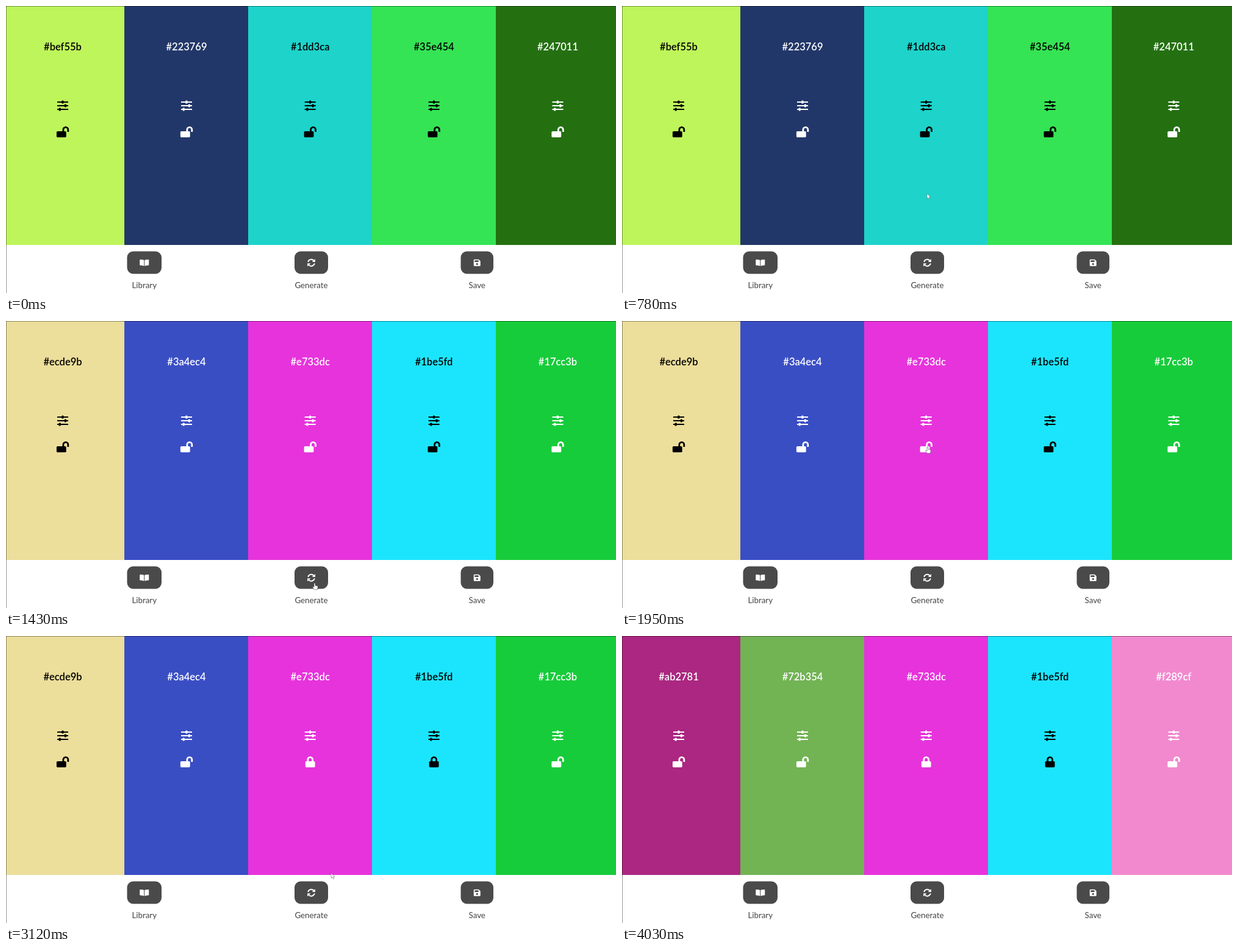
Write an HTML page that moves like this. It is 1000 by 472 pixels and loops after 5.07 s.

```html
<!DOCTYPE html>
<html lang="en">
<head>
<meta charset="utf-8">
<title>Palette generator</title>
<style>
  html, body { margin: 0; width: 100%; height: 100%; overflow: hidden; background: #fff; }
  svg { display: block; width: 100%; height: 100%; }
  text { font-family: Lato, "Open Sans", sans-serif; text-anchor: middle; }
  .hex { font-size: 16.5px; font-weight: 600; }
  .label { font-size: 13.3px; fill: #444; }
  .line { fill: none; stroke: currentColor; }
</style>
</head>
<body>
<svg id="stage" viewBox="0 0 1000 472">
  <defs>
    <g id="sliders" fill="currentColor">
      <path class="line" stroke-width="2" d="M-9 -6H9M-9 0H9M-9 6H9"/>
      <rect x="-1.7" y="-8.6" width="3.2" height="5.2" rx="1"/>
      <rect x="2.8" y="-2.6" width="3.2" height="5.2" rx="1"/>
      <rect x="-6.4" y="3.4" width="3.2" height="5.2" rx="1"/>
    </g>
    <g id="open" fill="currentColor">
      <rect x="-10.1" y="-1.1" width="15.8" height="10.1" rx="1.7"/>
      <path class="line" stroke-width="2.8" d="M.9 0V-3.7a3.94 3.94 0 0 1 7.9 0V0"/>
    </g>
    <g id="closed" fill="currentColor">
      <rect x="-7.9" y="-1.1" width="15.8" height="10.1" rx="1.7"/>
      <path class="line" stroke-width="2.8" d="M-3.94 0V-3.7a3.94 3.94 0 0 1 7.88 0V0"/>
    </g>
    <path id="page" d="M-.5 5.4V-4.1C-2.5 -5.3 -5 -5.4 -7 -5.2Q-7.5 -5.1 -7.5 -4.5V3.6Q-7.5 4.2 -7 4.2C-5 4.3 -2.5 4.5 -.5 5.4Z"/>
    <g id="book" fill="currentColor">
      <use href="#page"/><use href="#page" transform="scale(-1 1)"/>
    </g>
    <g id="turn" fill="currentColor">
      <path class="line" stroke-width="1.9" d="M-5.3 -1.2A5.3 5.3 0 0 1 3.9 -3.6"/>
      <path d="M6.4 -6.3V-1.1H1.2Z"/>
    </g>
    <g id="sync"><use href="#turn"/><use href="#turn" transform="rotate(180)"/></g>
    <path id="disk" fill="currentColor" fill-rule="evenodd"
      d="M-4.3 -5.5H2.6L5.5 -2.6V4.3Q5.5 5.5 4.3 5.5H-4.3Q-5.5 5.5 -5.5 4.3V-4.3Q-5.5 -5.5 -4.3 -5.5ZM-3.9 -3.9V-1.1H2.4V-3.9ZM0 .6a1.6 1.6 0 1 0 .01 0Z"/>
    <path id="arrow" fill="#fff" stroke="#555" stroke-width=".5" d="M0 0V8.4L2 6.6L3.4 9.6L4.8 9L3.4 6H6Z"/>
    <path id="hand" fill="#fff" stroke="#333" stroke-width=".5"
      d="M-1 .6Q0 -.8 1 .6V4L4.6 4.8Q5.4 5.2 5.2 6.4L4.4 10.8H-.6L-3.4 7Q-3.4 5.6 -2 6L-1 6.8Z"/>
  </defs>
</svg>
<script>
const LOOP = 5070, STEP = 130;
const svg = document.getElementById("stage");
const edges = [0, 194, 397, 600, 803, 1000];
const centers = [93, 296, 498.7, 701.6, 904.5];
const buttons = [
  { x: 198.5, w: 56.5, icon: "book", label: "Library" },
  { x: 473, w: 55, icon: "sync", label: "Generate" },
  { x: 745.5, w: 53.5, icon: "disk", label: "Save" }
];
const palettes = [
  [0, "#bef55b #223769 #1dd3ca #35e454 #247011"],
  [1430, "#ecde9b #3a4ec4 #e733dc #1be5fd #17cc3b"],
  [3510, "#ab2781 #72b354 #e733dc #1be5fd #f289cf"]
];
const lockTime = [Infinity, Infinity, 2210, 2730, Infinity];
// pointer path: time, x, y
const path = [
  [260, 494, 186], [520, 494, 186], [1040, 506, 431], [1430, 506, 431],
  [1950, 501, 207], [2210, 501, 207], [2600, 703, 207], [2730, 703, 207],
  [3120, 533, 390], [3250, 503, 422], [3510, 503, 422], [3900, 530, 480]
];

function add(tag, attrs, parent = svg) {
  const el = document.createElementNS("http://www.w3.org/2000/svg", tag);
  for (const k in attrs) el.setAttribute(k, attrs[k]);
  return parent.appendChild(el);
}
const place = (x, y) => `translate(${x} ${y})`;

function ink(hex) {
  const lum = [.2126, .7152, .0722].reduce((sum, k, i) => {
    const c = parseInt(hex.substr(1 + i * 2, 2), 16) / 255;
    return sum + k * (c <= .03928 ? c / 12.92 : ((c + .055) / 1.055) ** 2.4);
  }, 0);
  return lum > .5 ? "#000" : "#fff";
}

const columns = centers.map((x, i) => {
  const g = add("g");
  const back = add("rect", { x: edges[i], y: 0, width: edges[i + 1] - edges[i], height: 393 }, g);
  const text = add("text", { class: "hex", x, y: 73, fill: "currentColor" }, g);
  add("use", { href: "#sliders", transform: place(x, 164) }, g);
  const lock = add("use", { transform: place(x, 207) }, g);
  return { g, back, text, lock };
});

for (const b of buttons) {
  const x = b.x + b.w / 2;
  add("rect", { x: b.x, y: 403.5, width: b.w, height: 37, rx: 10, fill: "#4a4a4a" });
  add("use", { href: "#" + b.icon, transform: place(x, 422.2), color: "#fff" });
  add("text", { class: "label", x, y: 464 }).textContent = b.label;
}
add("path", { d: "M0 .5H1000M.5 0V472", stroke: "#000", "stroke-opacity": .4 });
const pointer = add("use");

function pointerAt(t) {
  const i = path.findIndex(p => p[0] > t);
  if (i < 1) return null;
  const [t0, x0, y0] = path[i - 1], [t1, x1, y1] = path[i];
  const u = (t - t0) / (t1 - t0);
  return [x0 + (x1 - x0) * u, y0 + (y1 - y0) * u];
}

function clickable(x, y) {
  const onButton = y > 403 && y < 441 && buttons.some(b => x > b.x && x < b.x + b.w);
  const onIcon = [164, 207].some(v => Math.abs(y - v) < 10) && centers.some(c => Math.abs(x - c) < 11);
  return onButton || onIcon;
}

function draw(now) {
  const t = Math.floor((now % LOOP) / STEP) * STEP;
  const colors = palettes.filter(p => p[0] <= t).pop()[1].split(" ");
  columns.forEach((c, i) => {
    c.back.setAttribute("fill", colors[i]);
    c.g.setAttribute("color", ink(colors[i]));
    c.text.textContent = colors[i];
    c.lock.setAttribute("href", t >= lockTime[i] ? "#closed" : "#open");
  });
  const at = pointerAt(t);
  pointer.setAttribute("visibility", at ? "visible" : "hidden");
  if (at) {
    pointer.setAttribute("transform", place(...at));
    pointer.setAttribute("href", clickable(...at) ? "#hand" : "#arrow");
  }
}

const start = performance.now();
function tick() {
  draw(performance.now() - start);
  requestAnimationFrame(tick);
}
tick();
</script>
</body>
</html>
```
